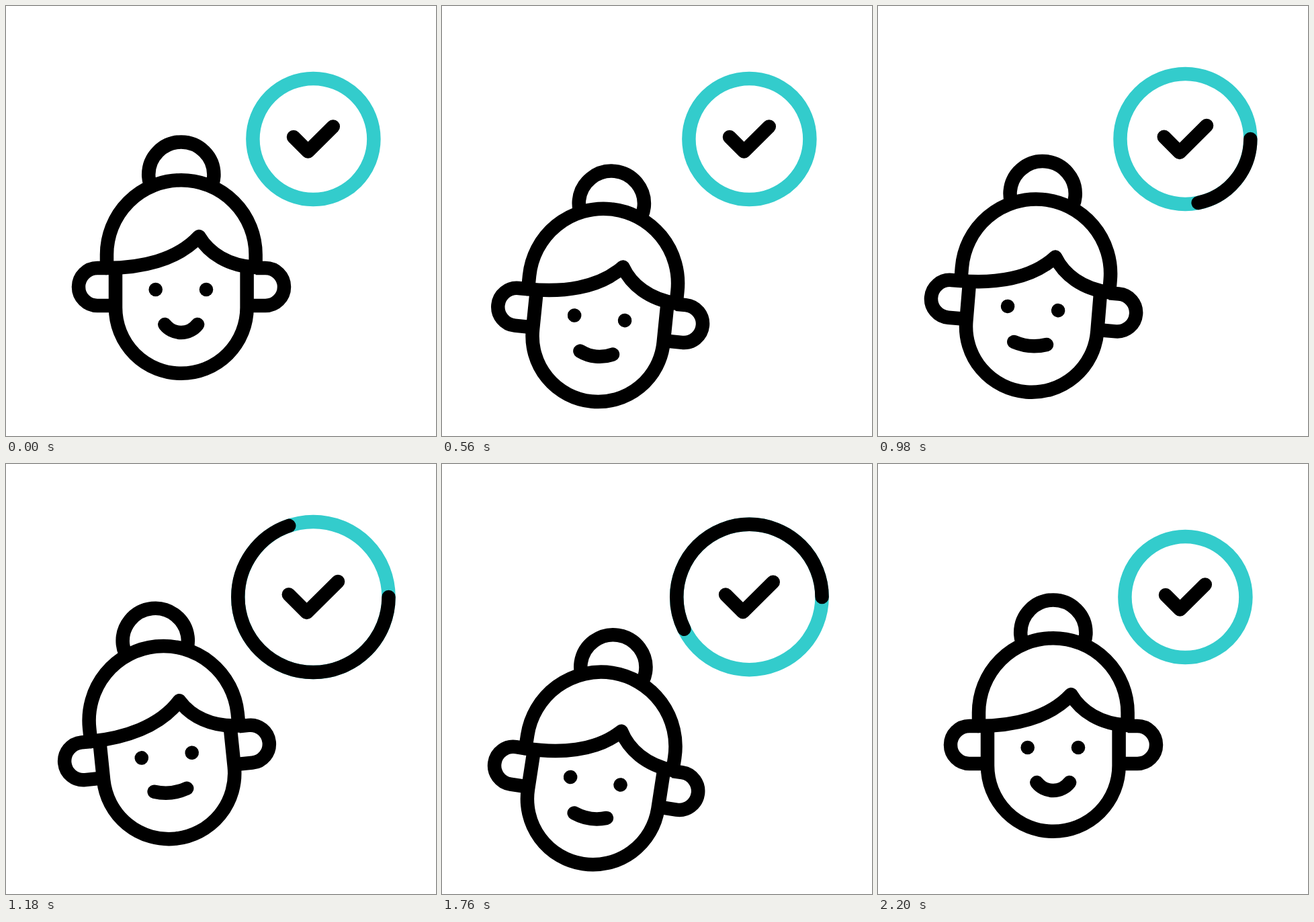
An HTML page that plays this animation: 640x640 px, repeating every 2.4 s.

```html
<!DOCTYPE html>
<html lang="en">
<head>
<meta charset="utf-8">
<title>Approved profile</title>
<style>
  html, body { margin: 0; width: 100%; height: 100%; overflow: hidden; background: #fff; }
  svg { display: block; width: 100%; height: 100%; }
  .line { fill: none; stroke: #000; stroke-width: 20.5; stroke-linecap: round; stroke-linejoin: round; }
</style>
</head>
<body>
<svg viewBox="0 0 640 640">
  <g id="head" class="line">
    <g stroke-linecap="butt">
      <path d="M214.5 265Q212.2 258 212.2 251A48.6 48.6 0 0 1 309.4 251Q309.4 258 307.1 265"/>
      <path d="M150 390V370A110.8 110.8 0 0 1 371.6 370V390"/>
      <path d="M163 390V449A97.8 97.8 0 0 0 358.6 449V390"/>
      <path d="M150 390H136A28 28 0 0 0 136 446H163M371.6 390H386A28 28 0 0 1 386 446H358.6"/>
    </g>
    <path d="M150 390C200 390 254 379 287.3 343C302 368 331 387 371.6 389"/>
    <path id="mouth"/>
    <g fill="#000" stroke="none">
      <circle cx="222.7" cy="422" r="10.3"/>
      <circle cx="298" cy="422" r="10.3"/>
    </g>
  </g>
  <g class="line" transform="translate(457.4 198)">
    <circle id="ring" style="stroke:#3cc"/>
    <circle id="trace" pathLength="1"/>
    <path id="check"/>
  </g>
</svg>
<script>
const LOOP = 2400;
const $ = id => document.getElementById(id);
const set = (id, attrs) => {
  for (const name in attrs) $(id).setAttribute(name, attrs[name]);
};

// Eased progress from 0 to 1 between two times
const ease = (t, from, to) => {
  const x = Math.min(1, Math.max(0, (t - from) / (to - from)));
  return x * x * (3 - 2 * x);
};

// Value at time t along [time, value] keys, eased between neighbours
const track = (t, keys) => keys.slice(1).reduce(
  (value, [time, next], i) => value + (next - keys[i][1]) * ease(t, keys[i][0], time),
  keys[0][1]);

const DROP = [[200, 0], [700, 52.5], [1200, 11.6], [1700, 52.5], [2200, 0]];
const TILT = [[200, 0], [820, 9.3], [1318, -9.3], [1812, 9.3], [2200, 0]];
const TICK = [[-29.4, -3], [-7.9, 18.5], [29.4, -18.5]];

function draw(t) {
  const lean = ease(t, 200, 700) - ease(t, 1700, 2200);
  const y = track(t, DROP), tilt = track(t, TILT);
  set('head', { transform: `translate(${-25.9 * lean} ${y}) rotate(${tilt} 260.7 375)` });

  // Smile as a circular arc of given depth over a fixed chord
  const half = 24.4, depth = 12 - 8 * lean;
  const bend = (half * half + depth * depth) / (2 * depth);
  set('mouth', { d: `M236.3 474A${bend} ${bend} 0 0 0 285.1 474` });

  const end = ease(t, 800, 1400), start = ease(t, 1400, 2200);
  const r = 90 + 31.7 * (end - start);
  set('ring', { r });
  set('trace', {
    r,
    'stroke-dasharray': `${end - start} 2`,
    'stroke-dashoffset': -start,
    visibility: end > start ? 'visible' : 'hidden'
  });
  set('check', { d: 'M' + TICK.map(p => p.map(v => v * r / 90)).join('L') });
}

const began = performance.now();
function tick() {
  draw((performance.now() - began) % LOOP);
  requestAnimationFrame(tick);
}
tick();
</script>
</body>
</html>
```
